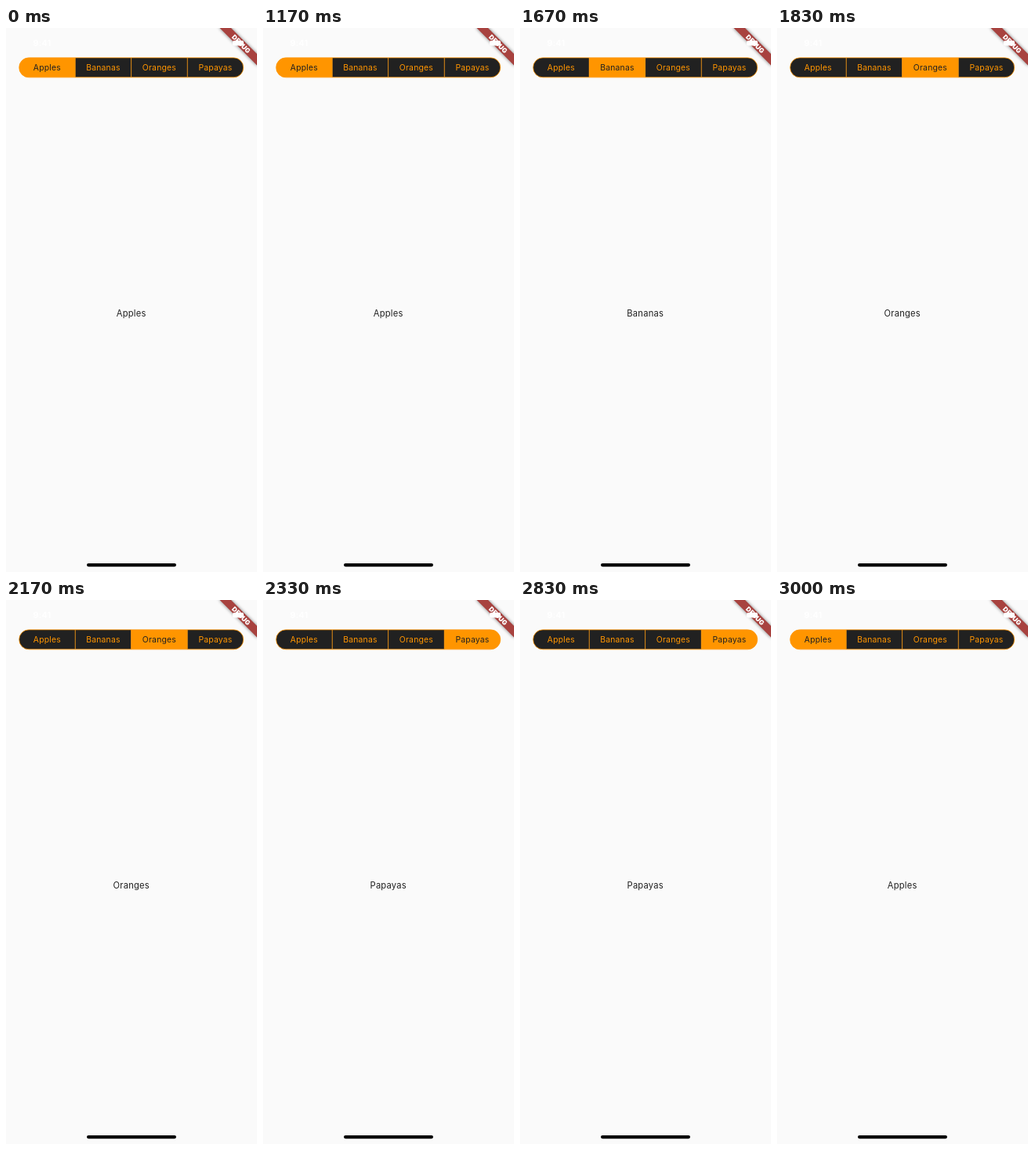
An HTML page that plays this animation: 320x692 px, repeating every 3.17 s.

```html
<!DOCTYPE html>
<html lang="en">
<head>
<meta charset="utf-8">
<title>Fruit tabs</title>
<style>
  html, body { margin: 0; width: 100%; height: 100%; overflow: hidden; background: #fafafa; }
  svg { display: block; width: 320px; height: 692px; }
  text { font-family: Inter, Roboto, sans-serif; text-anchor: middle; letter-spacing: .2px; }
  .tab { font-size: 10.4px; }
  #page { font-size: 11.2px; fill: #212121; }
  .clock { font-size: 11px; font-weight: 600; fill: #fff; }
  .debug { font-size: 8.4px; font-weight: 900; fill: #fff; letter-spacing: 0; }
</style>
</head>
<body>
<svg viewBox="0 0 320 692">
  <defs>
    <clipPath id="pill"><rect x="16.7" y="37.8" width="286" height="25" rx="12.5"/></clipPath>
    <filter id="blur" x="-30%" y="-100%" width="160%" height="300%"><feGaussianBlur stdDeviation="2.2"/></filter>
  </defs>
  <text class="clock" x="46" y="22.5">9:41</text>
  <g id="tabs" clip-path="url(#pill)"></g>
  <rect x="16.7" y="37.8" width="286" height="25" rx="12.5" fill="none" stroke="#ff9500" stroke-width=".8"/>
  <text id="page" x="159.7" y="367"></text>
  <g transform="translate(320 0) rotate(45)">
    <rect x="-34" y="23.4" width="68" height="10.2" opacity=".5" filter="url(#blur)"/>
    <rect x="-34" y="23.4" width="68" height="10.2" fill="#a8423f"/>
    <text class="debug" x="0" y="31.6">DEBUG</text>
  </g>
  <rect x="289" y="16" width="14" height="6.5" rx="2" fill="#fff"/>
  <rect x="103" y="681" width="114" height="4.2" rx="2.1"/>
</svg>
<script>
  const ORANGE = '#ff9500', DARK = '#212121';
  const LEFT = 16.7, TOP = 37.8, WIDTH = 71.5, HEIGHT = 25, LOOP = 3170;
  const names = ['Apples', 'Bananas', 'Oranges', 'Papayas'];
  const steps = [[3000, 0], [2330, 3], [1830, 2], [1330, 1], [0, 0]]; // start time, tab
  const group = document.getElementById('tabs');
  const page = document.getElementById('page');

  function add(tag, attrs) {
    const node = document.createElementNS('http://www.w3.org/2000/svg', tag);
    for (const key in attrs) node.setAttribute(key, attrs[key]);
    return group.appendChild(node);
  }

  const tabs = names.map((name, i) => {
    const x = LEFT + i * WIDTH;
    const box = add('rect', { x, y: TOP, width: WIDTH, height: HEIGHT });
    const label = add('text', { class: 'tab', x: x + WIDTH / 2, y: 54 });
    label.textContent = name;
    return { box, label };
  });
  for (let i = 1; i < names.length; i++)
    add('rect', { x: LEFT + i * WIDTH - .4, y: TOP, width: .8, height: HEIGHT, fill: ORANGE });

  let shown = -1;
  function draw() {
    const time = performance.now() % LOOP;
    const active = steps.find(([start]) => time >= start)[1];
    if (active !== shown) {
      shown = active;
      page.textContent = names[active];
      tabs.forEach(({ box, label }, i) => {
        box.setAttribute('fill', i === active ? ORANGE : DARK);
        label.setAttribute('fill', i === active ? DARK : ORANGE);
      });
    }
    requestAnimationFrame(draw);
  }
  draw();
</script>
</body>
</html>
```
